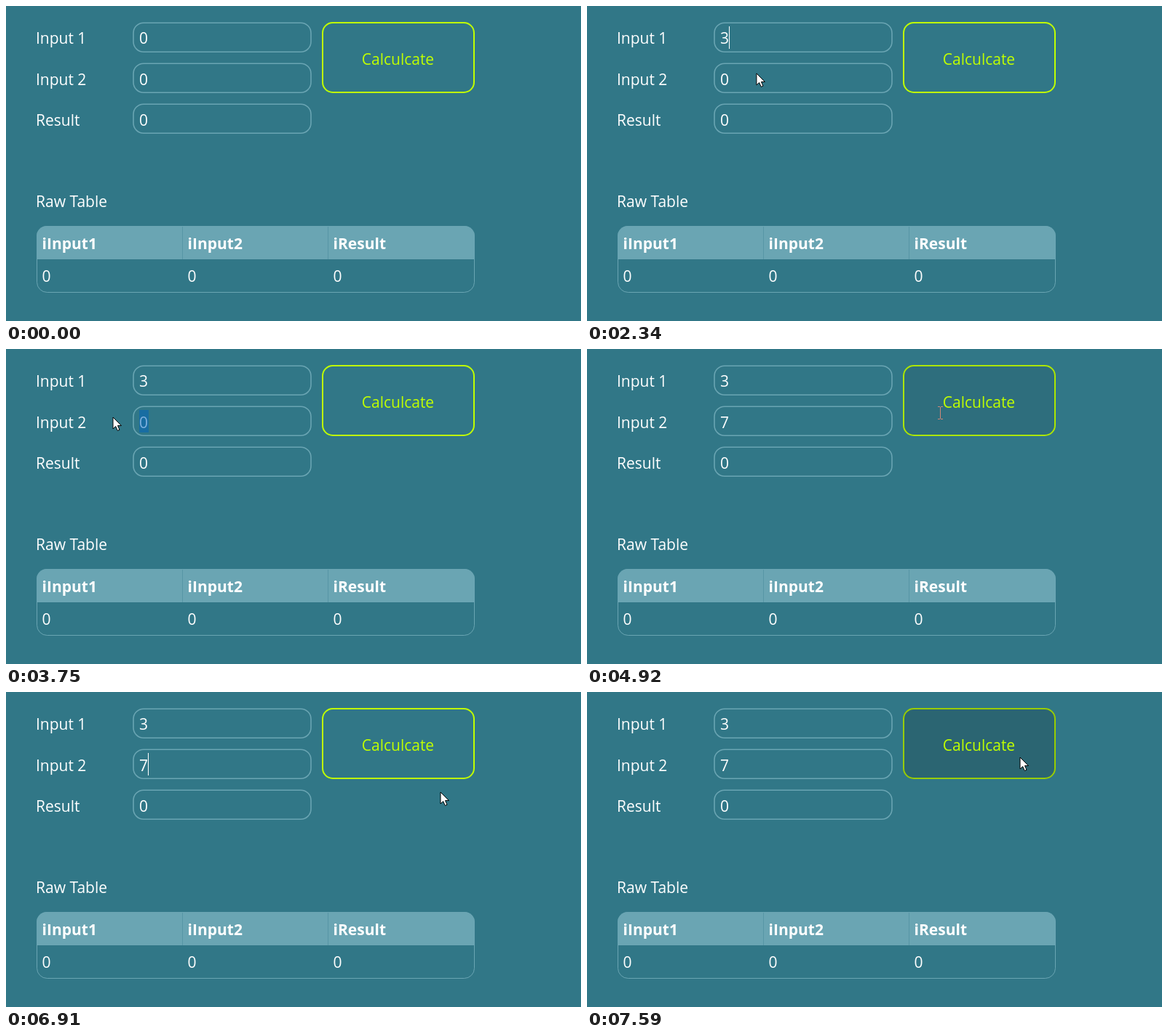
An HTML page with a canvas for the animation above (8000 ms loop, 790 by 434 pixels).

```html
<!DOCTYPE html>
<html lang="en">
<head>
<meta charset="utf-8">
<title>Calculator form</title>
<style>
  html, body { margin: 0; width: 100%; height: 100%; overflow: hidden; background: #317787; }
  canvas { display: block; }
</style>
</head>
<body>
<canvas id="stage" width="790" height="434"></canvas>
<script>
const ctx = document.getElementById('stage').getContext('2d');
const LOOP = 8000, ENTER = 200, BLINK = 540;
const LINE = '#6aa5b3', BG = [49, 119, 135], LIME = [192, 255, 0];
const FONT = '21px "Open Sans", "Noto Sans", sans-serif';
const BUTTON = { x: 435, y: 23, w: 208, h: 96 };

// Each field is selected by dragging, then overwritten by typing.
const FIELDS = [
  { label: 'Input 1', press: 1040, release: 1590, typed: 1870, blur: 3200, value: '3' },
  { label: 'Input 2', press: 3200, release: 3700, typed: 4360, blur: 7100, value: '7' },
  { label: 'Result' }
];

// Pointer strokes; it rests between them.
const STROKES = [
  { from: 200, to: 970, x: 219, y: 47 },
  { from: 1040, to: 1320, x: 147, y: 46 },
  { from: 1870, to: 2480, x: 246, y: 100 },
  { from: 2690, to: 3200, x: 228, y: 105 },
  { from: 3200, to: 3550, x: 141, y: 98 },
  { from: 3690, to: 3750, x: 147, y: 94 },
  { from: 4360, to: 5120, x: 554, y: 87 },
  { from: 5440, to: 5780, x: 597, y: 138 },
  { from: 6910, to: 7050, x: 595, y: 100 },
  { from: 7190, to: 7590, x: 595, y: 90 }
];

const within = (v, from, to) => v >= from && v < to;
const mix = (a, b, k) => a + (b - a) * k;
const blend = (a, b, k) => `rgb(${a.map((v, i) => Math.round(mix(v, b[i], k)))})`;
const fieldTop = i => 23 + Math.round(56.2 * i);

function ease(k) {
  k = Math.max(0, Math.min(1, k));
  return k * k * (3 - 2 * k);
}

function pointer(t) {
  let x = 691, y = 425;
  for (const s of STROKES) {
    const k = ease((t - s.from) / (s.to - s.from));
    x = mix(x, s.x, k);
    y = mix(y, s.y, k);
  }
  return { x, y };
}

function inside(p, x, y, w, h) {
  return within(p.x, x, x + w) && within(p.y, y, y + h);
}

// Share of the last moments spent over the button, which fades the hover style.
function hoverAmount(t) {
  const { x, y, w, h } = BUTTON, samples = 10;
  let hits = 0;
  for (let i = 0; i < samples; i++) hits += inside(pointer(t - i * 15), x, y, w, h);
  return hits / samples;
}

function text(str, x, y, color = '#fff', bold = false) {
  ctx.font = (bold ? 'bold ' : '') + FONT;
  ctx.fillStyle = color;
  ctx.fillText(str, x, y);
}

function box(x, y, w, h, stroke, width, fill) {
  ctx.beginPath();
  ctx.roundRect(x, y, w, h, 14);
  if (fill) {
    ctx.fillStyle = fill;
    ctx.fill();
  }
  ctx.strokeStyle = stroke;
  ctx.lineWidth = width;
  ctx.stroke();
}

function drawField(f, i, t) {
  const top = fieldTop(i), baseline = Math.round(52.3 + 56.4 * i);
  text(f.label, 41, baseline);
  box(175, top + 0.2, 244, 40, LINE, 1.6);
  text(t >= f.typed ? f.value : '0', 183, baseline);
  if (within(t, f.press + 140, f.typed)) {
    ctx.fillStyle = 'rgba(0, 100, 190, 0.5)';
    ctx.fillRect(183, top + 5, 13, 31);
  }
  if (within(t, f.typed, f.blur) && (t - f.typed) % (2 * BLINK) < BLINK) {
    ctx.fillStyle = '#fff';
    ctx.fillRect(195, top + 5, 1, 31);
  }
}

function drawButton(t) {
  const hover = hoverAmount(t);
  const { x, y, w, h } = BUTTON;
  box(x, y, w, h, blend(LIME, [152, 204, 0], hover), 2, blend(BG, [43, 101, 114], hover));
  ctx.textAlign = 'center';
  text('Calculcate', x + w / 2 - 0.5, 81, `rgb(${LIME})`);
  ctx.textAlign = 'left';
}

function drawTable() {
  text('Raw Table', 41, 277);
  ctx.save();
  ctx.beginPath();
  ctx.roundRect(42, 303, 602, 92, 14);
  ctx.clip();
  ctx.fillStyle = LINE;
  ctx.fillRect(42, 303, 602, 46);
  ctx.restore();
  box(42.5, 303.5, 601, 91, LINE, 1);
  ['iInput1', 'iInput2', 'iResult'].forEach((name, i) => {
    const x = 49.6 + i * 200;
    if (i) {
      ctx.fillStyle = '#5796a5';
      ctx.fillRect(42 + i * 200, 304, 1, 45);
    }
    text(name, x, 335, '#fff', true);
    text('0', x, 380);
  });
}

function drawArrow(x, y) {
  const shape = [[0, 0], [0, 16], [3.7, 12.6], [6.3, 18.5], [9, 17.3], [6.5, 11.6], [11.5, 11.6]];
  ctx.beginPath();
  shape.forEach(([dx, dy]) => ctx.lineTo(x + dx, y + dy));
  ctx.closePath();
  ctx.fillStyle = '#fff';
  ctx.fill();
  ctx.strokeStyle = '#000';
  ctx.lineWidth = 1;
  ctx.stroke();
}

function drawBeam(x, y) {
  x = Math.round(x);
  y = Math.round(y);
  ctx.fillStyle = '#ce8878';
  ctx.fillRect(x, y - 8, 1, 16);
  for (const end of [y - 9, y + 8]) {
    ctx.fillRect(x - 3, end, 3, 1);
    ctx.fillRect(x + 1, end, 3, 1);
  }
}

function drawPointer(t) {
  if (t < ENTER) return;
  const { x, y } = pointer(t);
  // The pointer shape lags slightly behind its position.
  const old = pointer(t - 100);
  const overField = FIELDS.some((f, i) => inside(old, 178, fieldTop(i) + 4, 238, 33));
  (overField ? drawBeam : drawArrow)(x, y);
  if (FIELDS.some(f => within(t, f.press, f.release))) {
    ctx.fillStyle = 'rgba(255, 255, 0, 0.5)';
    ctx.beginPath();
    ctx.arc(x, y, 12, 0, Math.PI * 2);
    ctx.fill();
  }
}

function draw(t) {
  ctx.fillStyle = `rgb(${BG})`;
  ctx.fillRect(0, 0, 790, 434);
  FIELDS.forEach((f, i) => drawField(f, i, t));
  drawButton(t);
  drawTable();
  drawPointer(t);
}

const start = performance.now();
function tick() {
  draw((performance.now() - start) % LOOP);
  requestAnimationFrame(tick);
}
tick();
</script>
</body>
</html>
```
